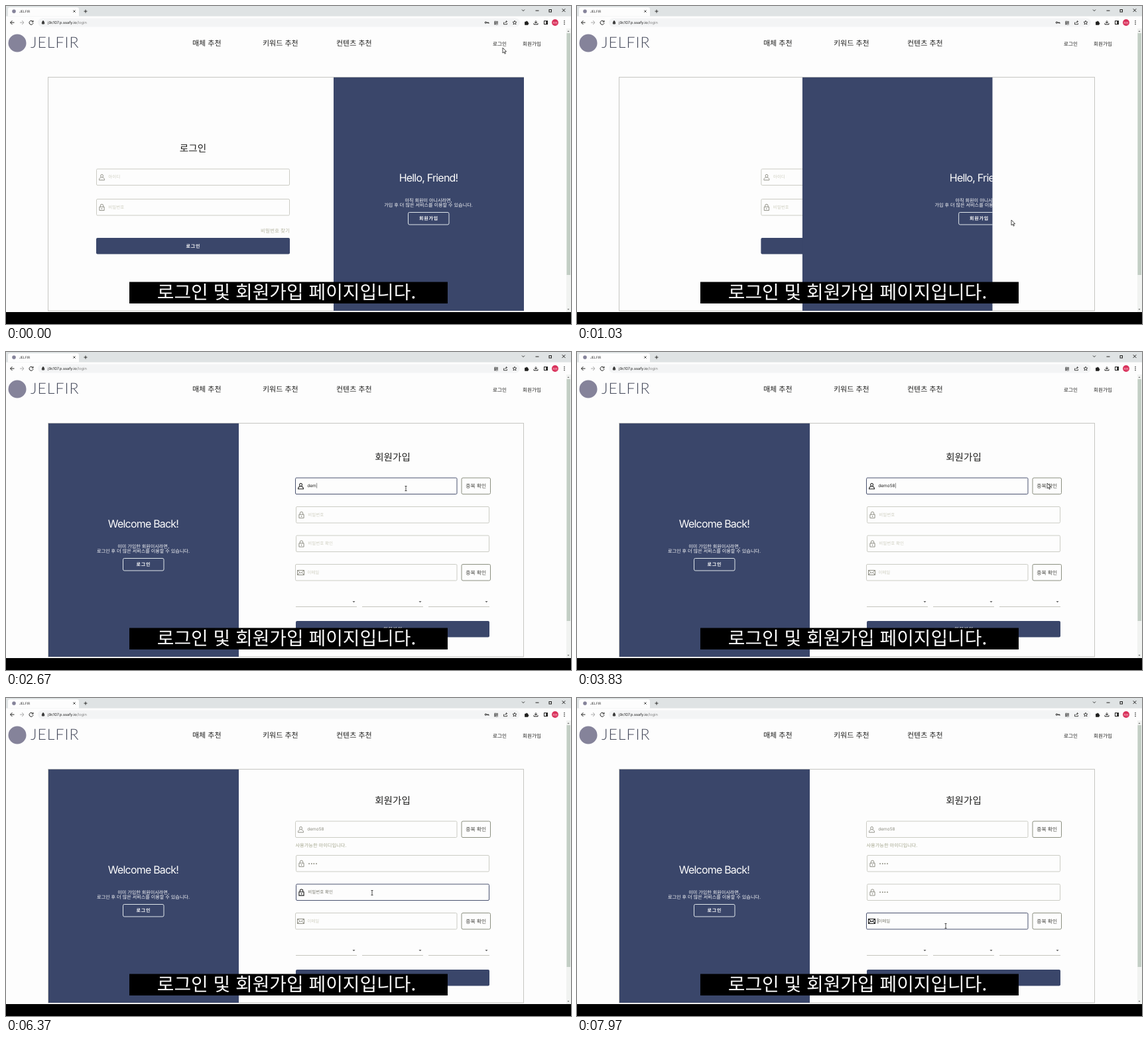
These frames come from a looping animation (852x480 px, 8 s). An HTML page:

```html
<!DOCTYPE html>
<html lang="ko">
<head>
<meta charset="utf-8">
<title>로그인 및 회원가입</title>
<style>
  html, body { margin: 0; width: 100%; height: 100%; overflow: hidden; background: #000; }
  #stage { display: block; width: 100%; height: 100%; }
  text { font-family: Inter, "Noto Sans CJK KR", "Noto Sans CJK", sans-serif; text-rendering: geometricPrecision; white-space: pre; }
  .ko { font-family: "Noto Sans CJK KR", "Noto Sans CJK", sans-serif; }
  .brand { font-family: Lato, sans-serif; letter-spacing: 1px; }
  .mid { text-anchor: middle; }
  .bold { font-weight: 700; letter-spacing: .8px; }
  .hello { font-family: Inter, sans-serif; letter-spacing: -.8px; }
  .thin { font-weight: 300; }
</style>
</head>
<body>
<svg id="stage" viewBox="0 0 852 480">
  <g id="browser"></g>
  <g id="page"></g>
  <g id="caption"></g>
</svg>
<script>
const LOOP = 8000;
const PAPER = '#fdfdfd', SLATE = '#3a466a', INK = '#20201f', MUTED = '#b4b4a0';
const IDLE = '#cbccc4', FOCUS = '#4a5270', WHITE = '#fdfdfd';
const CARD = { x: 63.5, y: 107.5, w: 717, h: 352.5 };
const SLIDE = { start: 781, length: 600, travel: 430 };
const BRAND = 'JELFIR', USER_ID = 'demo58';
const CHECKED_AT = 3900, PASSWORD_AT = 5150, CONFIRM_AT = 6600;

const get = id => document.getElementById(id);
const text = (x, y, size, str, fill = INK, cls = 'ko') =>
  `<text x="${x}" y="${y}" font-size="${size}" fill="${fill}" class="${cls}">${str}</text>`;
const mid = (x, y, size, str, fill, cls = '') => text(x, y, size, str, fill, 'ko mid ' + cls);
const rect = (x, y, w, h, fill, stroke = 'none', r = 0) =>
  `<rect x="${x}" y="${y}" width="${w}" height="${h}" rx="${r}" fill="${fill}" stroke="${stroke}"/>`;
const path = (d, stroke = INK, width = 1, fill = 'none') =>
  `<path d="${d}" fill="${fill}" stroke="${stroke}" stroke-width="${width}"/>`;
const circle = (x, y, r, fill) => `<circle cx="${x}" cy="${y}" r="${r}" fill="${fill}"/>`;
const shift = (dx, dy, body) => `<g transform="translate(${dx} ${dy})">${body}</g>`;
const clip = (x, y, w, h, body) =>
  `<svg x="${x}" y="${y}" width="${w}" height="${h}" viewBox="${x} ${y} ${w} ${h}">${body}</svg>`;
const at = (x, y, d, stroke, width, fill) => shift(x, y, path(d, stroke, width, fill));

const clamp = v => Math.min(1, Math.max(0, v));
const smooth = v => v * v * (3 - 2 * v);

// CSS ease-in-out, cubic-bezier(.42, 0, .58, 1)
function easeInOut(x) {
  if (x <= 0 || x >= 1) return clamp(x);
  let low = 0, high = 1, s = .5;
  for (let i = 0; i < 20; i++) {
    s = (low + high) / 2;
    if (1.26 * s * (1 - s) ** 2 + 1.74 * s * s * (1 - s) + s ** 3 < x) low = s; else high = s;
  }
  return smooth(s);
}

const typed = (str, t, start) => str.slice(0, Math.max(0, Math.floor((t - start) / 130) + 1));

const icons = {
  user: 'M-1.8-2a1.9 2.2 0 1 0 3.8 0a1.9 2.2 0 1 0-3.8 0M-1.2 .3C-4 1.2-4 2.5-4 4.3H4C4 2.5 4 1.2 1.2 .3',
  lock: 'M-3.6-.8H3.6V4.6H-3.6ZM-2.2-.8V-2.6a2.2 2.2 0 0 1 4.4 0V-.8M0 1V3',
  mail: 'M-5-3.5H5V3.5H-5ZM-5-3.5L0 .8L5-3.5M-5 3.5L-1.4-.4M5 3.5L1.4-.4'
};

function field(x, y, w, icon, hint, { value = '', focused = false, caret = false } = {}) {
  const textX = x + 18.3;
  const content = value
    ? text(textX, y + 14.6, 6.5, value + (caret ? '|' : ''), focused ? INK : '#8d8d80', '')
    : text(textX, y + 14.8, 6.5, hint, focused ? '#77776c' : '#cfcfc0') +
      (caret ? path(`M${textX - .5} ${y + 8.5}v8`, INK, .7) : '');
  return rect(x + .5, y + .5, w - 1, 24.5, PAPER, focused ? FOCUS : IDLE, 1.5) +
    at(x + 8.5, y + 13, icons[icon], focused ? '#222' : '#85857a', focused ? 1.1 : .9) + content;
}

const outlineButton = (x, label) =>
  rect(x + .5, 311.5, 61.5, 18.5, 'none', '#dfe6ea', 2) + mid(x + 31.4, 323.4, 7, label, WHITE, 'bold');

function drawBrowser() {
  const chevron = 'M-2-1L0 1L2-1';
  return rect(0, 0, 852, 462, PAPER) + rect(0, 0, 852, 15.5, '#dfe3e4') +
    path('M3 15.5V5q0-3 3-3H107q3 0 3 3V15.5Z', 'none', 0, PAPER) +
    circle(12, 8, 2.8, '#85839a') + text(20, 10, 5, BRAND, '#333', '') +
    at(103, 8, 'M-1.6-1.6L1.6 1.6M1.6-1.6L-1.6 1.6', INK, .8) +
    at(120, 8, 'M-2.5 0H2.5M0-2.5V2.5', INK, .9) +
    at(780, 6.5, chevron, INK, .9) + at(801, 7, 'M-2.5 0H2.5') +
    rect(819, 5.5, 3.5, 3.5, 'none', INK) + at(841, 6.5, 'M-2.3-2.3L2.3 2.3M2.3-2.3L-2.3 2.3') +
    rect(48, 18.5, 727, 13, '#f3f4f5', 'none', 6.5) +
    at(9.5, 25, 'M3 0H-3M0-3L-3 0L0 3') + at(24, 25, 'M-3 0H3M0-3L3 0L0 3', '#aaa') +
    at(38, 25, 'M2.4-1.7A3 3 0 1 0 3 .6M3-3.2V-1H.7') +
    at(56, 25, 'M-1.6-.4H1.6V2H-1.6ZM-1-.4V-1.5a1 1 0 0 1 2 0V-.4', INK, .8, '#555') +
    `<text x="63" y="27" font-size="5.7" fill="#222">j9c107.p.ssafy.io<tspan fill="#808080">/login</tspan></text>` +
    mid(739, 27.5, 6.5, '翻', INK) +
    at(753, 25, 'M-2.5-.5V2.7H2.5V1M-1 .8Q-.6-1.5 2.5-1.5M1-3L2.7-1.5L1 0', INK, .8) +
    at(767, 25, 'M0-3L.9-.9L3-.8L1.4 .6L2 2.8L0 1.6L-2 2.8L-1.4 .6L-3-.8L-.9-.9Z', INK, .8) +
    at(785, 25.5, 'M-2.5-1.5H-.8a1 1 0 0 1 2 0H2V.1a1 1 0 0 1 0 2V2.8H-2.5Z', INK, .8, INK) +
    at(799, 25, 'M0-3V1M-2-1L0 1L2-1M-3 1V2.8H3V1') +
    rect(811.5, 22.5, 5, 5, 'none', INK) + rect(814.3, 22.5, 2.2, 5, INK) +
    circle(828, 25, 5, '#d9305a') + mid(828, 26.5, 4, '회원', '#ffe9ee') +
    [22.5, 25, 27.5].map(y => circle(842, y, .8, INK)).join('') +
    rect(845, 34, 7, 428, '#f1f3f1') + rect(845.5, 41, 5.5, 365, '#c2cec4') +
    at(848, 38, 'M-1.5 1L0-1L1.5 1Z', 'none', 0, '#777') +
    at(848, 458, 'M-1.5-1L0 1L1.5-1Z', 'none', 0, '#777') +
    circle(17, 56, 13.5, '#85839a') + text(37, 63, 23, BRAND, '#44485a', 'brand thin') +
    text(281, 60.4, 11, '매체 추천') + text(387, 60.4, 11, '키워드 추천') +
    text(498, 60.4, 11, '컨텐츠 추천') +
    text(734, 59.6, 7.6, '로그인') + text(779, 59.6, 7.6, '회원가입');
}

const drawCaption = () => rect(0, 462, 852, 18, '#000') + rect(186, 416.5, 480, 32.5, '#000') +
  mid(423, 442.4, 27.9, '로그인 및 회원가입 페이지입니다.', WHITE, 'thin');

const loginForm = () =>
  mid(282, 220, 14.6, '로그인') +
  field(136, 245.5, 292, 'user', '아이디') +
  field(136, 291, 292, 'lock', '비밀번호') +
  text(384, 342, 7.6, '비밀번호 찾기', MUTED) +
  rect(136, 350, 292, 24.5, SLATE, 'none', 2) + mid(282.4, 365, 7, '로그인', WHITE, 'bold');

function signupForm(t) {
  const checked = t >= CHECKED_AT, up = checked ? -4 : 0, down = -up;
  const focus = t < 2100 ? '' : !checked ? 'id' : t < 6200 ? 'password' : t < 7750 ? 'confirm' : 'email';
  const state = (name, value) => ({
    value, focused: focus === name, caret: focus === name && t % 1000 >= 500
  });
  const checkButton = y => rect(687, y + .5, 43.5, 24.5, PAPER, '#8b8f80', 2) +
    mid(708.7, y + 15.5, 7.8, '중복 확인', '#44443f');
  const select = x => path(`M${x} 384.5h92`, '#b8b8ae', .8) +
    at(x + 87.5, 377, 'M-2-1H2L0 1.3Z', 'none', 0, '#666');

  return rect(350.5, 108, 430, 352, PAPER) +
    shift(0, up,
      mid(583, 164, 14.6, '회원가입') +
      field(436, 189.5, 244.5, 'user', '아이디', state('id', typed(USER_ID, t, 2400))) +
      checkButton(189.5)) +
    (checked ? text(436.5, 224.5, 7.2, '사용가능한 아이디입니다.', '#a3a58c') : '') +
    shift(0, down,
      field(437, 233, 292, 'lock', '비밀번호', state('password', typed('••••', t, PASSWORD_AT))) +
      field(437, 276.5, 292, 'lock', '비밀번호 확인', state('confirm', typed('••••', t, CONFIRM_AT))) +
      field(436, 320, 244.5, 'mail', '이메일', state('email', '')) +
      checkButton(320) + [437, 537, 637].map(select).join('') +
      rect(437, 406, 292, 24.5, SLATE, 'none', 2) + mid(583.4, 421, 7, '회원가입', WHITE, 'bold'));
}

const tooltip = () => rect(540.5, 267, 88, 20, '#dcdcda', 'none', 2) +
  path('M539 267q0-2 2-2H544L547.5 261.5L551 265H625q2 0 2 2V283q0 2-2 2H541q-2 0-2-2Z', '#bfbfba', .8, PAPER) +
  rect(542, 270, 10, 10, '#f2a030', 'none', 1) + mid(547, 278, 8, '!', '#fff', 'bold') +
  text(556, 277.6, 6.6, '이 입력란을 작성하세요.');

const panelText = (x, title, line1, line2) =>
  text(x, 265, 16, title, WHITE, 'mid hello') +
  mid(x, 295.5, 7.1, line1, WHITE) + mid(x, 303.1, 7.1, line2, WHITE);

function slidingPanel(p) {
  const x = 494 - SLIDE.travel * p;
  return clip(x, CARD.y, 287, CARD.h,
    rect(x, CARD.y, 287, CARD.h, SLATE) +
    shift(-86 * p, 0,
      panelText(637, 'Hello, Friend!', '아직 회원이 아니시라면,', '가입 후 더 많은 서비스를 이용할 수 있습니다.') +
      outlineButton(606, '회원가입')) +
    shift(86 * (1 - p), 0,
      panelText(207, 'Welcome Back!', '이미 가입한 회원이시라면,', '로그인 후 더 많은 서비스를 이용할 수 있습니다.') +
      outlineButton(176, '로그인')));
}

// time, x, y
const mousePath = [
  [120, 749, 63], [620, 655, 323], [1600, 655, 323], [2000, 603, 206], [3300, 603, 206],
  [3750, 709, 198], [4150, 709, 198], [4600, 557, 256], [5800, 557, 256],
  [6150, 552, 294], [7250, 552, 294], [7650, 556, 344], [LOOP, 556, 344]
];

function mouse(t) {
  const i = Math.max(1, mousePath.findIndex(k => k[0] >= t));
  const [t0, x0, y0] = mousePath[i - 1], [t1, x1, y1] = mousePath[i];
  const k = smooth(clamp((t - t0) / (t1 - t0)));
  const x = x0 + (x1 - x0) * k, y = y0 + (y1 - y0) * k;
  const overField = t > 1850 && x < 680;
  return overField
    ? at(x, y, 'M-1.5-3.5H1.5M0-3.5V3.5M-1.5 3.5H1.5', INK, .8)
    : at(x, y, 'M0 0V8L1.9 6.3L3.2 9.2L4.4 8.6L3.2 5.8H5.6Z', INK, .8, '#fff');
}

function drawPage(t) {
  const progress = (t - SLIDE.start) / SLIDE.length, p = easeInOut(progress);
  const keyShown = t < 2200 || t >= PASSWORD_AT;
  return (keyShown ? at(725, 25, 'M-2.8 0a1.2 1.2 0 1 0 2.4 0a1.2 1.2 0 1 0-2.4 0M-.4 0H3V1.5M1.5 0V1.2', INK, 1) : '') +
    clip(CARD.x, CARD.y, CARD.w, CARD.h,
      shift(394 * p, 0, loginForm()) +
      (progress >= .5 ? shift(-SLIDE.travel * (1 - p), 0, signupForm(t)) : '')) +
    rect(CARD.x, CARD.y, CARD.w, CARD.h, 'none', '#c6c6c2') +
    slidingPanel(p) +
    (t >= CHECKED_AT && t < PASSWORD_AT ? tooltip() : '') +
    mouse(t);
}

get('browser').innerHTML = drawBrowser();
get('caption').innerHTML = drawCaption();

const begin = performance.now();
function frame() {
  get('page').innerHTML = drawPage((performance.now() - begin) % LOOP);
  requestAnimationFrame(frame);
}
frame();
</script>
</body>
</html>
```
